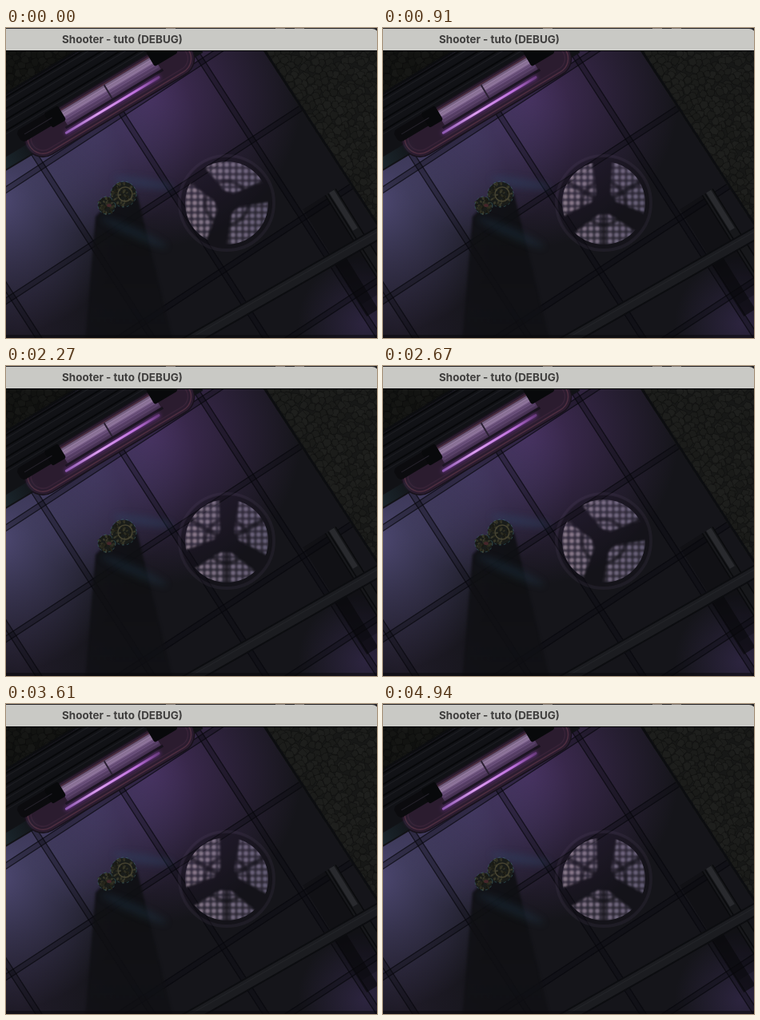
Write an HTML page with a canvas that moves like this. It is 464 px wide and 388 px high and loops after 4970 ms.

```html
<!DOCTYPE html>
<html lang="en">
<head>
<meta charset="utf-8">
<title>Fan light</title>
<style>
html, body { margin: 0; width: 100%; height: 100%; overflow: hidden; background: #111215; }
canvas { display: block; }
</style>
</head>
<body>
<canvas id="stage" width="464" height="388"></canvas>
<script>
const W = 464, H = 388, LOOP = 4970, BAR = 28;
const FAN = { x: 276, y: 219, r: 52, start: 44.5, speed: 180 };
const SIZE = 132, MID = SIZE / 2;
const RAD = Math.PI / 180;
const ctx = document.getElementById('stage').getContext('2d');

function layer(w, h) {
  const c = document.createElement('canvas');
  c.width = w;
  c.height = h;
  return c.getContext('2d');
}

let seed = 11;
function rand(min = 0, max = 1) {
  seed = (seed * 16807) % 2147483647;
  return min + (max - min) * seed / 2147483647;
}

// Runs a drawing in its own turned coordinates.
function turned(g, x, y, degrees, draw) {
  g.save();
  g.translate(x, y);
  g.rotate(degrees * RAD);
  draw();
  g.restore();
}

function rect(g, fill, x, y, w, h, radius = 0) {
  g.beginPath();
  g.roundRect(x, y, w, h, radius);
  g.fillStyle = fill;
  g.fill();
}

function oval(g, fill, x, y, rx, ry = rx, turn = 0) {
  g.beginPath();
  g.ellipse(x, y, rx, ry, turn, 0, 7);
  g.fillStyle = fill;
  g.fill();
}

function ring(g, color, width, x, y, r) {
  g.beginPath();
  g.arc(x, y, r, 0, 7);
  g.strokeStyle = color;
  g.lineWidth = width;
  g.stroke();
}

function poly(g, fill, ...pts) {
  g.beginPath();
  pts.forEach(p => g.lineTo(...p));
  g.closePath();
  g.fillStyle = fill;
  g.fill();
}

function glow(g, x, y, r, rgb, alpha) {
  const grad = g.createRadialGradient(x, y, 0, x, y, r);
  grad.addColorStop(0, `rgba(${rgb},${alpha})`);
  grad.addColorStop(.5, `rgba(${rgb},${alpha * .5})`);
  grad.addColorStop(1, `rgba(${rgb},0)`);
  g.fillStyle = grad;
  g.fillRect(0, 0, W, H);
}

function drawFloor(g) {
  g.fillStyle = '#15151a';
  g.fillRect(0, 0, W, H);
  glow(g, 180, 85, 190, '98,62,132', .62);
  glow(g, -10, 215, 170, '112,104,168', .62);
  glow(g, 110, 130, 130, '84,78,130', .42);
  glow(g, 20, 380, 120, '72,52,96', .2);
  glow(g, 450, 370, 85, '68,52,100', .5);
}

// Tile joints: two thin dark edges with the floor between them.
function drawJoints(g) {
  const joint = (x, y, degrees) => turned(g, x, y, degrees, () => {
    rect(g, 'rgba(12,11,17,.32)', -600, -4, 1200, 8);
    for (const edge of [-4, 2.8]) rect(g, 'rgba(8,8,12,.62)', -600, edge, 1200, 1.3);
  });
  for (let i = -2; i < 4; i++) {
    joint(108 + i * 100, 271 - i * 65.5, 57.3);
    if (i < 3) joint(108 + i * 63, 271 + i * 98, -33.2);
  }
}

// Cobbles fill the area above the local x axis.
function drawRocks(g, x, y, degrees, depth, light) {
  turned(g, x, y, degrees, () => {
    g.beginPath();
    g.rect(-120, -depth, 420, depth);
    g.clip();
    rect(g, `rgb(${light - 5},${light - 4},${light - 5})`, -120, -depth, 420, depth);
    for (let py = -depth; py < 5; py += 8) {
      for (let px = -120; px < 300; px += 9) {
        const shade = light + rand(-2, 3) | 0;
        const cx = px + rand(0, 6), cy = py + rand(0, 5);
        const corners = Array.from({ length: 6 }, (_, k) => {
          const a = k * 60 * RAD + rand(0, .6), r = rand(4.2, 6.5);
          return [cx + r * Math.cos(a), cy + r * Math.sin(a)];
        });
        poly(g, `rgb(${shade},${shade + 1},${shade - 1})`, ...corners);
        g.strokeStyle = 'rgba(10,11,10,.4)';
        g.lineWidth = .8;
        g.stroke();
      }
    }
    rect(g, '#0c0d10', -120, -3, 420, 3);
  });
}

function drawLamp(g) {
  drawRocks(g, 0, 84, -31, 90, 20);
  turned(g, 74, 132, -31, () => {
    rect(g, '#111216', -130, -79, 330, 81);
    for (let i = 0; i < 4; i++) {
      rect(g, '#07080a', -130, -78 + i * 12, 330, 2);
      rect(g, '#1e1f24', -130, -74 + i * 12, 330, 1);
    }

    rect(g, '#2b1c2f', -50, -32, 240, 46, 28);
    g.lineWidth = 1.5;
    for (const [inset, color] of [[0, '#17121b'], [4, '#4e2e40'], [8, '#382338']]) {
      g.beginPath();
      g.roundRect(-50 + inset, -32 + inset, 240 - inset * 2, 46 - inset * 2, 28 - inset);
      g.strokeStyle = color;
      g.stroke();
    }

    const panel = g.createLinearGradient(0, -27, 0, -6);
    panel.addColorStop(0, '#6d5a78');
    panel.addColorStop(.3, '#8d7499');
    panel.addColorStop(.5, '#614772');
    panel.addColorStop(1, '#3c2947');
    rect(g, panel, 8, -27, 136, 20);
    for (let i = 0; i < 4; i++) rect(g, `rgba(190,160,205,${.4 - i * .09})`, 10, -24 + i * 4, 132, 1);
    rect(g, '#2b2133', 72, -27, 2, 20);
    rect(g, '#17121c', 4, -7, 142, 3);

    const tube = g.createLinearGradient(0, 0, 138, 0);
    tube.addColorStop(0, '#8c58b0');
    tube.addColorStop(.35, '#dc9df0');
    tube.addColorStop(.75, '#bd70dc');
    tube.addColorStop(1, '#66397a');
    g.save();
    g.shadowColor = '#8b43b8';
    g.shadowBlur = 5;
    rect(g, tube, 0, -1.5, 138, 3, 1.5);
    g.restore();

    rect(g, '#0b0b0e', -52, -34, 50, 17, 6);
    rect(g, '#08090b', -10, -35, 20, 21, 3);
    rect(g, '#25222b', -44, -26, 40, 1);
    rect(g, '#08090b', 139, -36, 34, 22, 3);
    const teal = g.createLinearGradient(-110, 0, -35, 0);
    teal.addColorStop(0, 'rgba(40,68,78,.6)');
    teal.addColorStop(1, 'rgba(40,68,78,0)');
    rect(g, teal, -110, -13, 75, 13);
  });
}

function drawRails(g) {
  turned(g, 400, 209, 58, () => {
    rect(g, 'rgba(8,9,12,.3)', 0, 0, 140, 34);
    rect(g, '#17181b', 0, -14, 140, 14);
    rect(g, '#292a2e', 0, -12, 56, 7);
    for (const edge of [-15, -4, 0]) rect(g, '#0a0b0d', 0, edge, 140, 1.5);
    rect(g, 'rgba(8,9,11,.65)', 66, 20, 90, 17);
  });
  turned(g, 222, 388, -29.7, () => {
    rect(g, '#1b1c20', -20, 0, 320, 13);
    rect(g, '#0c0d10', -20, -1, 320, 2);
    rect(g, '#232428', -20, 4, 320, 1);
    rect(g, '#0c0d10', -20, 13, 320, 2);
  });
}

function drawHero(g) {
  const shade = g.createLinearGradient(0, 210, 0, H);
  shade.addColorStop(0, 'rgba(14,15,18,.92)');
  shade.addColorStop(1, 'rgba(16,16,20,.75)');
  g.save();
  g.filter = 'blur(1.5px)';
  poly(g, shade, [112, 236], [136, 212], [164, 208], [209, 392], [99, 392]);
  g.filter = 'blur(4px)';
  oval(g, 'rgba(46,84,120,.28)', 172, 194, 38, 6, .15);
  oval(g, 'rgba(38,76,100,.24)', 160, 256, 45, 6, .42);
  g.restore();

  const parts = [[126, 222, 11], [147, 208, 16]];
  for (const [x, y, r] of parts) {
    oval(g, '#191c1a', x, y, r, r * .95);
    for (let i = 0; i < r * 4; i++) {
      const a = rand(0, 6.3), d = r * Math.sqrt(rand()) * .9, tone = rand(.5, 1.3);
      oval(g, `rgb(${46 * tone},${46 * tone},${34 * tone})`, x + d * Math.cos(a), y + d * Math.sin(a), rand(1, 2.6), 1.3, a);
    }
    g.setLineDash([3, 3]);
    ring(g, 'rgba(60,106,108,.6)', 1, x, y, r);
    g.setLineDash([]);
  }
  ring(g, '#464331', 1.5, 149, 208, 9);
  oval(g, '#45262a', 129, 222, 3, 2);
}

function drawTitle(g) {
  rect(g, '#242326', 0, 0, W, BAR + 1);
  for (const x of [200, 337, 361]) rect(g, '#77706c', x, 0, 12, 1);
  rect(g, '#c9c9c5', -20, 1, W + 22, BAR + 20, 8);
  g.clearRect(0, BAR, W, H);
  rect(g, '#08080a', 0, BAR, W, 1);
  g.fillStyle = '#3f3e3d';
  g.font = '700 13.45px Inter, "Open Sans", sans-serif';
  g.fillText('Shooter - tuto (DEBUG)', 70, 19);
}

function drawScene() {
  const g = layer(W, H), title = layer(W, H);
  drawFloor(g);
  drawJoints(g);
  drawRocks(g, 322, 29, 57, 200, 28);
  drawLamp(g);
  drawRails(g);
  drawHero(g);
  oval(g, 'rgba(18,15,25,.35)', FAN.x, FAN.y, 58);
  ring(g, 'rgba(100,85,120,.13)', 4, FAN.x, FAN.y, 59);
  rect(g, 'rgba(8,8,11,.5)', 0, 384, W, 4);
  drawTitle(title);
  g.drawImage(title.canvas, 0, 0);
  return g.canvas;
}

function drawDots() {
  const g = layer(SIZE, SIZE), pitch = 8;
  g.beginPath();
  g.arc(MID, MID, FAN.r, 0, 7);
  g.clip();
  rect(g, 'rgba(130,116,150,.24)', 0, 0, SIZE, SIZE);
  g.filter = 'blur(1.1px)';
  for (let i = -6; i <= 6; i++) {
    for (let j = -6; j <= 6; j++) {
      const warm = (6 - i) / 12;
      oval(g, `rgba(${150 + 30 * warm},${140 + 20 * warm},${176},${.52 + .16 * warm})`,
        MID + i * pitch, MID + j * pitch, 3);
    }
  }
  return g.canvas;
}

const scene = drawScene(), dots = drawDots(), fan = layer(SIZE, SIZE);

function drawFan(angle) {
  fan.globalCompositeOperation = 'source-over';
  fan.clearRect(0, 0, SIZE, SIZE);
  fan.drawImage(dots, 0, 0);
  fan.globalCompositeOperation = 'destination-out';
  fan.filter = 'blur(1.5px)';
  oval(fan, '#000', MID, MID, 14);
  for (let k = 0; k < 3; k++) {
    turned(fan, MID, MID, angle + 60 + k * 120, () =>
      poly(fan, '#000', [0, -8], [62, -14], [62, 14], [0, 8]));
    // The fixed grille shows as thin gaps behind the blades.
    turned(fan, MID, MID, 90 + k * 120, () => rect(fan, 'rgba(0,0,0,.8)', 0, -3, 56, 6));
  }
  ring(fan, 'rgba(0,0,0,.75)', 4.5, MID, MID, 27);
  fan.filter = 'none';
}

function render(now) {
  const t = now % LOOP;
  drawFan(FAN.start + FAN.speed * t / 1000);
  ctx.drawImage(scene, 0, 0);
  ctx.drawImage(fan.canvas, FAN.x - MID, FAN.y - MID);
}

let begin;
function tick(now) {
  begin ??= now;
  render(now - begin);
  requestAnimationFrame(tick);
}
render(0);
requestAnimationFrame(tick);
</script>
</body>
</html>
```
